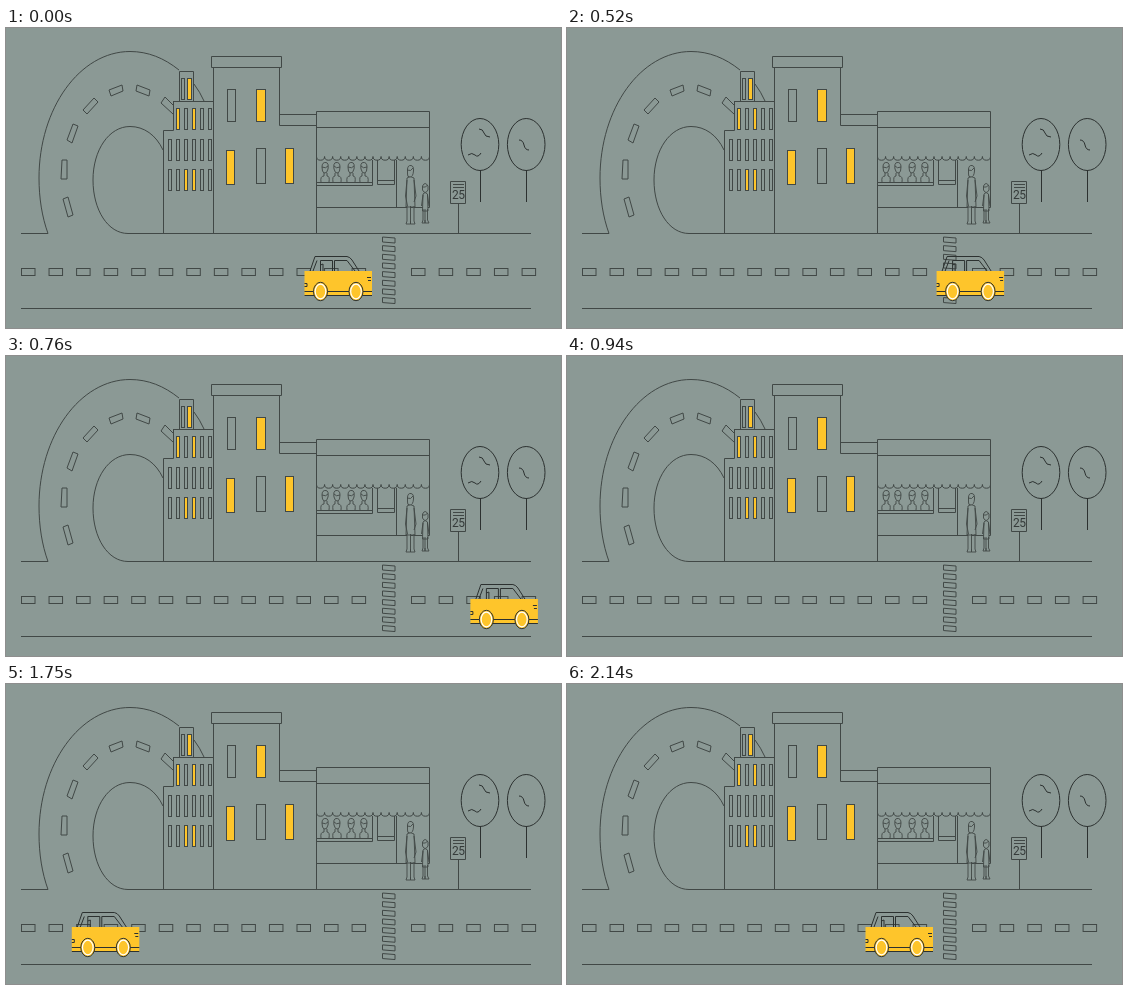
These frames come from a looping animation (555x300 px, 2.51 s). An HTML page:

```html
<!DOCTYPE html>
<html lang="en">
<head>
<meta charset="utf-8">
<title>Street</title>
<style>
html, body { margin: 0; width: 100%; height: 100%; overflow: hidden; background: #8b9995; }
svg { display: block; width: 555px; height: 300px; }
.line { fill: none; stroke: #414846; stroke-width: 1; }
.lit { fill: #fec52b; }
.paper { fill: #8b9995; }
.dark { stroke: #2c3130; }
text { font: 12px Roboto, sans-serif; letter-spacing: -.6px; fill: #343a39; stroke: none; }
</style>
</head>
<body>
<svg viewBox="0 0 555 300">
  <g class="line">
    <!-- winding road -->
    <path d="M42 205.5C36 189 33 170 33 150C33 80 74 23.5 124 23.5C142 23.5 158 30 173 42M188 56Q194 64 198 73"/>
    <path d="M157 122C150 107 138 98.5 124 98.5C103 98.5 87 122 87 152C87 182 102 205.5 122 205.5"/>
    <path d="M103 62L116 57L117 63L105 68ZM131 57L144 62L143 68L130 63ZM77 82L88 70L92 74L81 86ZM61 112L67 96L72 98L66 115ZM56 132L61 132L61 151L55 151ZM57 171L62 169L67 187L62 189ZM167 86L155 75L159 69L167 77"/>
    <path d="M15 205.5H42M122 205.5H525M15 280.5H525"/>
    <!-- towers -->
    <path d="M157.5 205V102.5H167.5V73.5H173.5V43.5H187.5V73.5H207.5M167 73.5H207"/>
    <path d="M207.5 205V39.5M205.5 28.5H275.5V39.5H205.5ZM273.5 39V97.5H310M273 86.5H310"/>
    <g id="windows"></g>
    <!-- shop -->
    <path id="awning"/>
    <path d="M310.5 205V83.5H423.5V179.5H310M310 99.5H423M310 154.5H366M310 157.5H366.5V132M371.5 132V156.5H388.5V132M371 152.5H388M390.5 132V179"/>
    <g id="diners" stroke-width=".9"></g>
    <g class="paper" stroke-width=".9">
      <path d="M401 178V193L400 196H404.5V178M404.5 193V196H409L408 193V178M401 150Q404 147 408 150L409 179H400ZM401 152L399.5 168L401.5 178M408 152L410 168L408 174"/>
      <path d="M401.5 146V141Q402 137 405 137.5Q408 138 407.5 143Q407 149 404 149Q401 149 401.5 146ZM401 142Q405 144 407 140"/>
      <path d="M417 181V192L416 195H419V181M419 192V195H423L421.5 192V181M417 166Q419 163 421.5 166L422 183H416.5ZM417 167L415.5 178M421.5 167L423 178"/>
      <path d="M416.5 162V158Q419 153 422 158V162Q419 167 416.5 162ZM416.5 159Q420 160 421.5 157"/>
    </g>
    <!-- trees and sign -->
    <g class="dark">
      <ellipse cx="474" cy="116.5" rx="18.8" ry="26"/>
      <ellipse cx="520.2" cy="116.5" rx="18.8" ry="26"/>
      <path d="M474.5 142V174M520.5 142V174M473 101Q477 101 478 105T484 109M462 127Q466 124 469 127T475 125M513 112Q517 112 518 117T523 122"/>
    </g>
    <path d="M444.5 153.5H459.5V175.5H444.5ZM452.5 176V205M447 156.5H458M447 159.5H458"/>
    <text x="446" y="171">25</text>
    <g id="road"></g>
    <!-- car, left edge at x = 0 -->
    <g id="car" class="dark">
      <path d="M6 243L11 228.5H43Q46 229 48 232L55 243M9 243L13 232.5M16.5 243V232.5H28.5V243M16.5 237L19 236V243M30.5 243V232.5H43L51 243"/>
      <path class="lit" stroke="none" d="M.5 243H68V268H.5Z"/>
      <path d="M.5 263.5H68M.5 267.5H68M.5 255.5H3V258.5H.5M63 249.5H67M64 252.5H67"/>
      <g id="wheels"></g>
    </g>
  </g>
</svg>
<script>
const $ = id => document.getElementById(id);
const add = (id, html) => $(id).insertAdjacentHTML("beforeend", html);
const pane = (x, y, w, h, lit) =>
  add("windows", `<rect x="${x}" y="${y}" width="${w}" height="${h}" class="${lit ? "lit" : ""}"/>`);

pane(175.5, 50.5, 3, 21);
pane(181.5, 50.5, 4, 21, true);
[[80.5, 1, [1, 3]], [111.5, 0, []], [141.5, 0, [2, 3]]].forEach(([y, first, lit]) => {
  for (let i = first; i < 6; i++) pane(162.5 + i * 8, y, 3, 21, lit.includes(i));
});
pane(221.5, 61.5, 8, 32);
pane(250.5, 61.5, 9, 32, true);
pane(220.5, 122.5, 8, 34, true);
pane(250.5, 120.5, 9, 35);
pane(279.5, 120.5, 8, 35, true);

$("awning").setAttribute("d", "M310.5 128.5" + "a4.035 3.7 0 0 0 8.07 0".repeat(14));

[319, 331, 345, 358].forEach((x, i) => {
  const s = i % 2 ? -1 : 1;
  add("diners", `<path transform="translate(${x} 0) scale(${s} 1)" d="M-3 139Q-3 134 1 134.5Q4 135 3 141Q2 146 -1 145Q-3 144 -3 139ZM-3 139Q1 141 3 138M-1 145V148Q-5 148 -4 154M2 145V148Q5 148 4 154"/>`);
});

const dash = x => add("road", `<rect x="${x}" y="240.5" width="13.5" height="7"/>`);
for (let i = 0; i < 13; i++) dash(15.5 + i * 27.55);
for (let i = 0; i < 5; i++) dash(405.5 + i * 27.65);
for (let i = 0; i < 8; i++)
  add("road", `<path d="M376.5 ${209 + i * 8.65}l12.5 1v5l-12.5 -1z"/>`);

for (const x of [16.5, 52])
  add("wheels", `<ellipse class="lit" cx="${x}" cy="263.5" rx="7" ry="9.2"/>
    <ellipse cx="${x}" cy="263.5" rx="5.3" ry="7.3" stroke="#fff" stroke-width="1.2"/>`);

const clamp = v => Math.max(0, Math.min(1, v));

function draw() {
  const t = performance.now() % 2510;
  let x = 298, alpha = 1;
  if (t < 1570) {
    // drive off to the right and fade
    const n = Math.max(0, Math.floor((t - 340) / 30));
    x += n * 11.85;
    alpha = clamp((20 - n) / 3);
  } else {
    // come in from the left
    const n = Math.min(19, Math.floor((t - 1570) / 30));
    x -= (19 - n) * 17.9;
    alpha = clamp((n + 1.2) / 3);
  }
  $("car").setAttribute("transform", `translate(${x} 0)`);
  $("car").setAttribute("opacity", alpha);
  requestAnimationFrame(draw);
}
draw();
</script>
</body>
</html>
```
